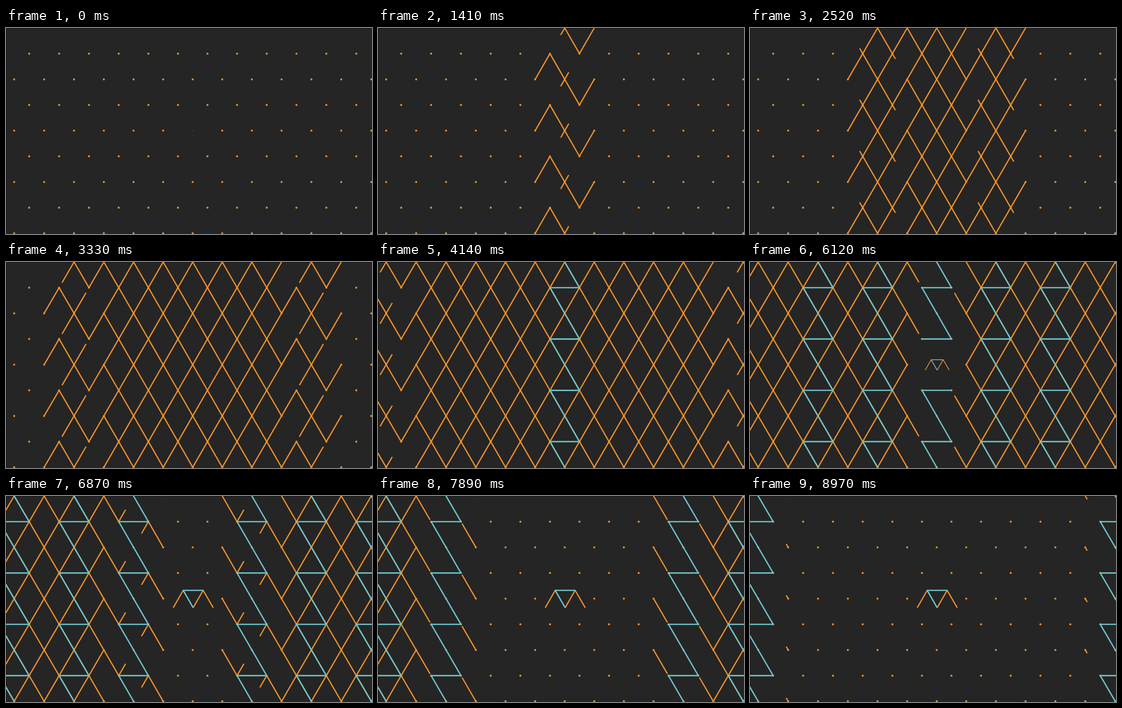
Recreate the animation shown at these times as an HTML page. Size 720 by 405 pixels, loop 9000 ms.

```html
<!DOCTYPE html>
<html lang="en">
<head>
<meta charset="utf-8">
<title>Lattice</title>
<style>
  html, body { margin: 0; width: 100%; height: 100%; overflow: hidden; background: #252525; }
  svg { display: block; width: 100vw; height: 100vh; }
  path { fill: none; stroke-width: 2.4; stroke-linejoin: round; }
  .orange { stroke: #f0922b; }
  .blue { stroke: #6fc3cb; stroke-width: 2.6; }
  .dot { fill: #ea922f; }
</style>
</head>
<body>
<svg id="stage" viewBox="0 0 720 405">
  <rect width="720" height="405" fill="#252525"/>
  <path d="M0 .5H720M.5 0V405" stroke="#151515" style="stroke-width:1"/>
  <g id="dots"></g>
  <g id="orangeLines"></g>
  <g id="blueLines"></g>
  <g id="mark">
    <path class="orange" d="M-39.2 17.3L-19.6 -16.8M0 17.3L19.6 -16.8L39.5 17.3"/>
    <path class="blue" d="M0 17.3L-19.6 -16.8H19.6"/>
  </g>
</svg>
<script>
const LOOP = 9000, PHASE = 900, HALF = PHASE / 2;
const NS = 'http://www.w3.org/2000/svg';
const $ = id => document.getElementById(id);
const clamp = v => Math.max(0, Math.min(1, v));

// Lattice coordinates (column, row) to pixels; columns widen slightly outwards.
const place = ([col, row]) => [367.3 + 58 * col + 0.09 * col * Math.abs(col), 50.45 * row];

function add(parent, tag, attrs) {
  const node = document.createElementNS(NS, tag);
  for (const name in attrs) node.setAttribute(name, attrs[name]);
  return parent.appendChild(node);
}

let hubDot;
for (let row = 1; row <= 8; row++) {
  const edge = row % 2 ? 5.5 : 6;
  for (let col = -edge; col <= edge; col++) {
    const [cx, cy] = place([col, row]);
    const dot = add($('dots'), 'circle', { class: 'dot', cx, cy, r: 2 });
    if (col === 0 && row === 4) hubDot = dot;
  }
}

// Each cell has three strokes, every one made of two mirrored two-edge paths.
function strokes(col, row) {
  const set = { inward: [], outward: [], zed: [] };
  for (const s of [-1, 1]) {
    const centre = [col, row], tip = [col + s, row];
    const near = [col + s / 2, row + s], far = [col + s / 2, row - s];
    set.inward.push([tip, near, centre].map(place));
    set.outward.push([centre, far, tip].map(place));
    set.zed.push([centre, near, [col - s / 2, row + s]].map(place));
  }
  return set;
}

function makeGroup(cells, draw, erase) {
  const group = { draw, erase, inward: [], outward: [], zed: [] };
  for (const [col, row] of cells) {
    const set = strokes(col, row);
    for (const name in set) group[name].push(...set[name]);
  }
  group.nodes = {
    inward: add($('orangeLines'), 'path', { class: 'orange' }),
    outward: add($('orangeLines'), 'path', { class: 'orange' }),
    zed: add($('blueLines'), 'path', { class: 'blue' })
  };
  return group;
}

const rows = [0, 2, 4, 6, 8];
const groups = [
  makeGroup([[0, 4]], 1, 5),
  makeGroup(rows.filter(r => r !== 4).map(r => [0, r]), 1, 6)
];
for (let i = 1; i <= 3; i++) {
  const cells = rows.flatMap(r => [[-2 * i, r], [2 * i, r]]);
  groups.push(makeGroup(cells, 1 + i, 6 + i));
}

function along(points, u) {
  const i = u < 1 ? 0 : 1, f = u - i, [a, b] = [points[i], points[i + 1]];
  return [a[0] + (b[0] - a[0]) * f, a[1] + (b[1] - a[1]) * f];
}

function trim(points, from, to) {
  if (to - from < 0.002) return '';
  const part = [along(points, 2 * from)];
  if (from < 0.5 && to > 0.5) part.push(points[1]);
  part.push(along(points, 2 * to));
  return 'M' + part.map(p => p.map(v => v.toFixed(2)).join(' ')).join('L');
}

function render(t) {
  const progress = start => clamp((t - start) / HALF);
  const show = (group, name, drawAt, eraseAt) => {
    const to = progress(drawAt), from = progress(eraseAt);
    group.nodes[name].setAttribute('d', group[name].map(p => trim(p, from, to)).join(''));
  };
  for (const g of groups) {
    const drawAt = g.draw * PHASE, eraseAt = g.erase * PHASE;
    show(g, 'inward', drawAt, eraseAt);
    show(g, 'outward', drawAt + HALF, eraseAt + HALF);
    show(g, 'zed', drawAt + 3 * PHASE, eraseAt + PHASE);
  }
  const opening = t < PHASE;
  const scale = opening
    ? Math.max(0.05, 1 - Math.abs(t / HALF - 1))
    : progress(6 * PHASE + HALF);
  $('mark').setAttribute('transform', `translate(368.2 202.3) scale(${scale})`);
  $('mark').style.display = scale > 0 ? '' : 'none';
  hubDot.style.display = scale > 0 ? 'none' : '';
}

const began = performance.now();
function tick() {
  render((performance.now() - began) % LOOP);
  requestAnimationFrame(tick);
}
render(0);
requestAnimationFrame(tick);
</script>
</body>
</html>
```
